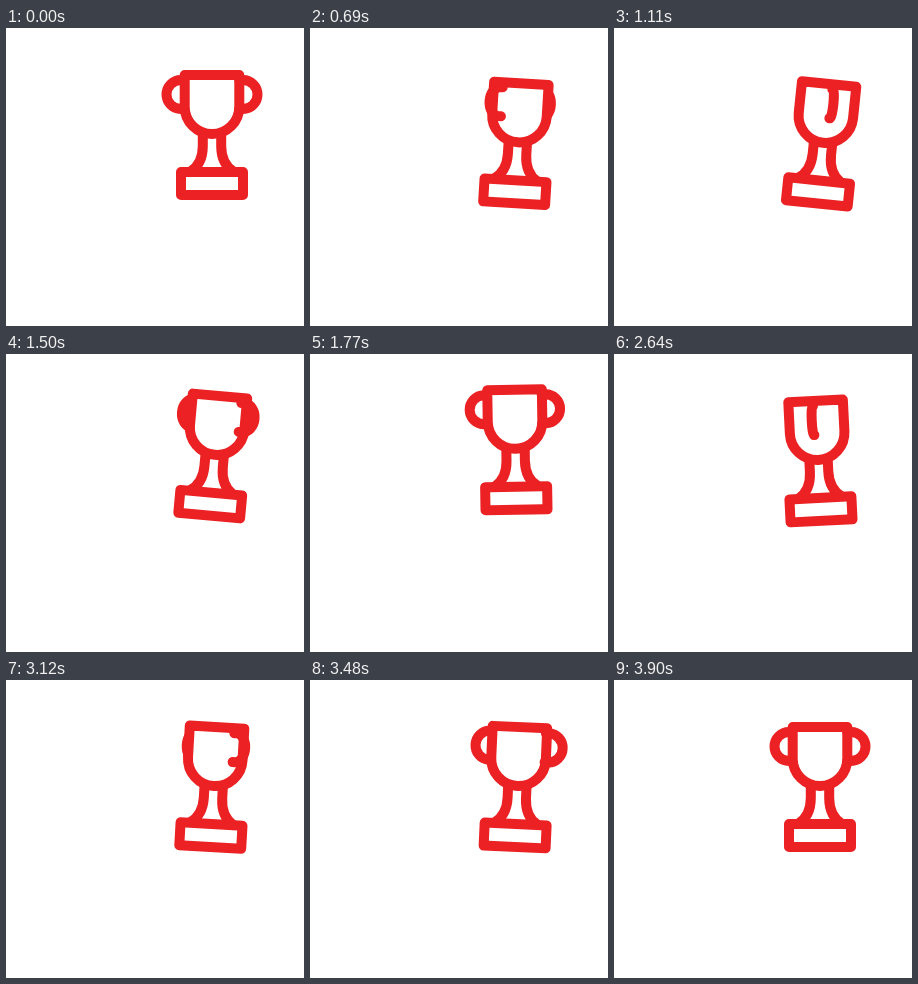
An HTML page with a canvas that plays this animation: 298x298 px, repeating every 4.5 s.

```html
<!DOCTYPE html>
<html lang="en">
<head>
<meta charset="utf-8">
<title>Turning trophy</title>
<style>
  html, body { margin: 0; width: 100%; height: 100%; overflow: hidden; background: #fff; }
  canvas { display: block; }
</style>
</head>
<body>
<canvas id="stage" width="298" height="298"></canvas>
<script>
const ctx = document.getElementById('stage').getContext('2d');
const RED = '#eb2123';
const LOOP = 4500, STEP = 30, START = 300;
const AXIS = 206, PIVOT_Y = 136;
const SWAP_LAG = 0.55;   // the handles change depth a little after full width

const clamp = (x, lo, hi) => Math.min(hi, Math.max(lo, x));
const progress = (t, from, to) => clamp((t - from) / (to - from), 0, 1);
const easeOut = u => Math.sin(u * Math.PI / 2);
const easeInOut = u => (1 - Math.cos(u * Math.PI)) / 2;
const swing = (t, from, to) => easeInOut(progress(t, from, to));

// One full turn in radians, a little faster at first.
function turnAt(t) {
  const u = progress(t, START, 3660);
  return 2 * Math.PI * (u + 0.045 * Math.sin(Math.PI * u));
}

// Lean right, left, right and back upright, in degrees.
function tiltAt(t) {
  return 6.3 * easeOut(progress(t, START, 1350))
    - 13.7 * swing(t, 1350, 2160)
    + 11 * swing(t, 2160, 3240)
    - 3.6 * swing(t, 3240, 3900);
}

// Crouch, leap and land, in pixels downwards.
function dropAt(t) {
  return 12 * swing(t, 390, 870)
    - 23.5 * swing(t, 870, 1830)
    + 11.5 * swing(t, 1830, 2700);
}

function shape(build, filled) {
  ctx.beginPath();
  build();
  if (filled) ctx.fill();
  ctx.stroke();
}

// The path is squeezed sideways, the stroke keeps its width.
function handle(width) {
  shape(() => {
    ctx.save();
    ctx.scale(width, 1);
    ctx.moveTo(27.3, 52);
    ctx.arc(31, 66.5, 14.5, -Math.PI / 2, Math.PI / 2);
    ctx.lineTo(27.3, 81);
    ctx.restore();
  });
}

function stem() {
  for (const side of [-1, 1]) {
    shape(() => {
      ctx.moveTo(9.2 * side, 107);
      ctx.lineTo(9.2 * side, 118);
      ctx.bezierCurveTo(9.2 * side, 130, 14 * side, 139, 22 * side, 144);
    });
  }
}

function cup() {
  shape(() => {
    ctx.moveTo(-27.3, 47);
    ctx.lineTo(27.3, 47);
    ctx.arc(0, 78.7, 27.3, 0, Math.PI);
    ctx.closePath();
  }, true);
}

function draw(t) {
  const turn = turnAt(t);
  const front = Math.cos(turn) * (Math.sin(turn - SWAP_LAG) >= 0 ? -1 : 1);

  ctx.setTransform(1, 0, 0, 1, 0, 0);
  ctx.fillStyle = '#fff';
  ctx.fillRect(0, 0, 298, 298);
  ctx.translate(AXIS, PIVOT_Y + dropAt(t));
  ctx.rotate(tiltAt(t) * Math.PI / 180);
  ctx.translate(0, -PIVOT_Y);
  ctx.strokeStyle = RED;
  ctx.lineWidth = 10;
  ctx.lineCap = ctx.lineJoin = 'round';

  handle(-front);
  stem();
  shape(() => ctx.rect(-31, 144, 62, 23), true);
  cup();
  handle(front);
}

function tick() {
  const t = performance.now() % LOOP;
  draw(Math.floor(t / STEP) * STEP);
  requestAnimationFrame(tick);
}
tick();
</script>
</body>
</html>
```
